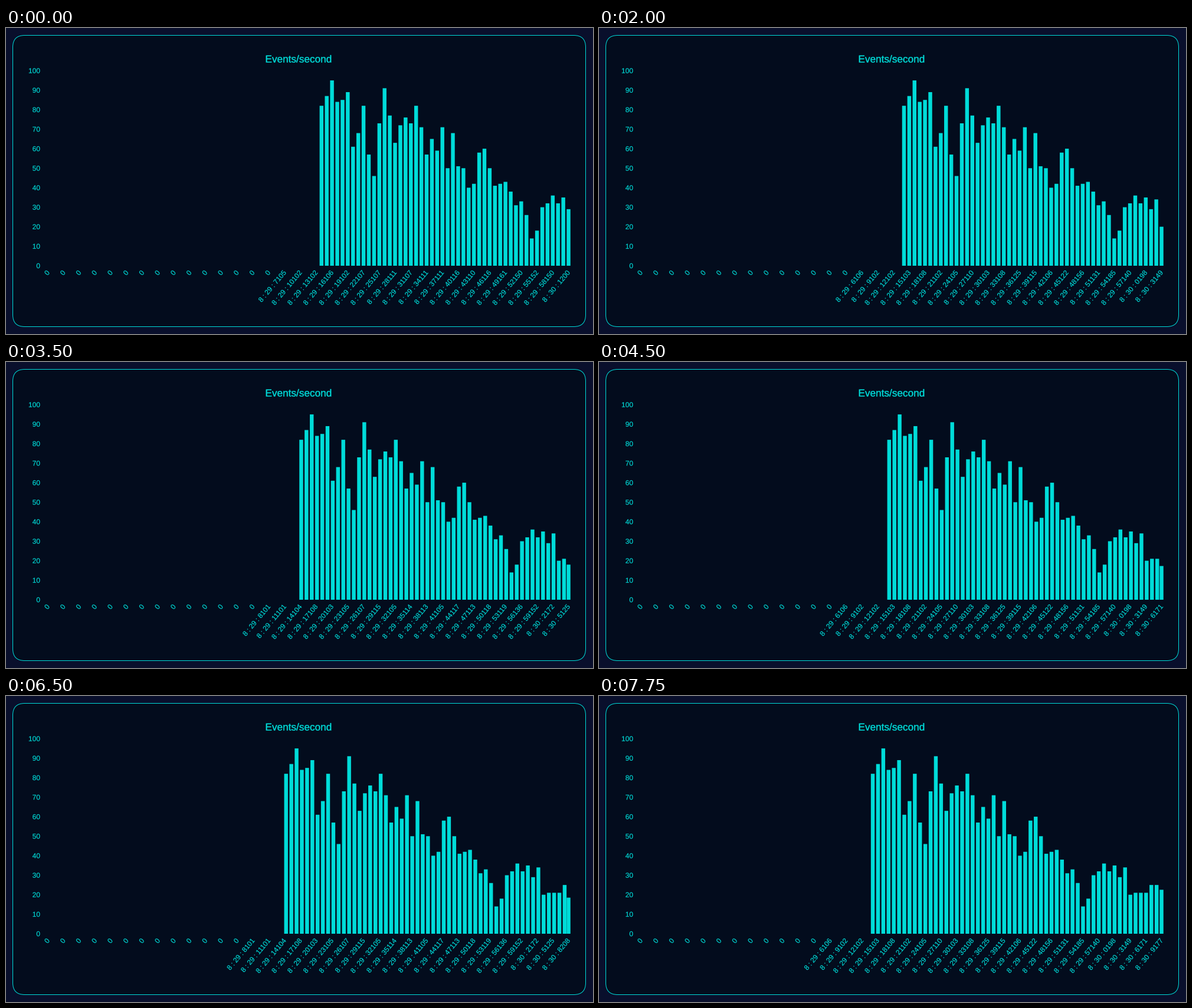
A matplotlib script that plays this animation: 995x520 px, repeating every 8 s.

```python
import matplotlib.pyplot as plt
from matplotlib.animation import FuncAnimation
from matplotlib.patches import FancyBboxPatch, PathPatch, Rectangle
from matplotlib.textpath import TextPath
from matplotlib.transforms import Affine2D

W, H, DPI = 995, 520, 80
STEP_MS, FRAMES = 250, 32
OUTER, PANEL, CYAN = "#090f2c", "#030c1d", "#00dcd9"
FONT = {"family": "Liberation Sans"}

# Chart geometry in pixels
LEFT, RIGHT, BASE, UNIT = 67, 958, 404, 3.315
SLOTS = 100
PITCH = (RIGHT - LEFT) / SLOTS
BAR_W = PITCH * 0.72
TICK_PX, TICK_ANGLE = 11.9, 50

# A new reading arrives every PERIOD ms; seconds count from 8:29:00
PERIOD, PHASE, EASE_MS = 1033, 16, 1000
FIRST_BAR, FIRST_LABEL, NEXT_SEC = 14, 6, 62

VALUES = [
    82, 87, 95, 84, 85, 89, 61, 68, 82, 57, 46, 73, 91, 77, 63, 72, 76, 73, 82,
    71, 57, 65, 59, 71, 50, 68, 51, 50, 40, 42, 58, 60, 50, 41, 42, 43, 38, 31,
    33, 26, 14, 18, 30, 32, 36, 32, 35, 29, 34, 20, 21, 21, 21, 25, 25, 24,
]
MILLIS = [
    106, 105, 101, 102, 102, 101, 102, 102, 104, 103, 106, 108, 108, 102, 103,
    102, 107, 105, 105, 107, 107, 110, 111, 115, 103, 107, 105, 108, 111, 114,
    125, 111, 113, 115, 116, 105, 106, 110, 117, 122, 116, 113, 156, 161, 118,
    131, 150, 119, 185, 152, 136, 140, 150, 152, 198, 200, 172, 149, 128, 125,
    171, 199, 208, 177,
]

fig = plt.figure(figsize=(W / DPI, H / DPI), dpi=DPI, facecolor=OUTER)
ax = fig.add_axes([0, 0, 1, 1])
ax.set_xlim(0, W)
ax.set_ylim(H, 0)
ax.axis("off")


def px(n):
    """Pixels to points."""
    return n * 72 / DPI


glyphs = {}


def text_path(text, size, x, y, align=1.0, angle=0, drop=0):
    """Outline of text; align 1 ends it at x, 0.5 centres it there."""
    key = text, size
    if key not in glyphs:
        path = TextPath((0, 0), text, size=size, prop=FONT)
        glyphs[key] = path, path.get_extents()
    path, box = glyphs[key]
    end = box.x1 + 0.04 * size
    shift = end if align == 1 else box.x0 + align * box.width
    move = Affine2D().scale(1, -1).translate(-shift, drop)
    return move.rotate_deg(-angle).translate(x, y).transform_path(path)


def add_text(path, weight=0.15):
    patch = PathPatch(path, fc=CYAN, ec=CYAN, lw=px(weight), snap=False)
    return ax.add_patch(patch)


def slot_x(slot):
    return LEFT + (slot + 0.5) * PITCH


def tick_path(text, slot):
    return text_path(text, TICK_PX, slot_x(slot), BASE + 9.3,
                     angle=TICK_ANGLE, drop=4.2)


def stamp(sec):
    if sec < FIRST_LABEL:
        return "0"
    return f"8 : {29 + sec // 60} : {sec % 60}{MILLIS[sec - FIRST_LABEL]}"


ax.add_patch(FancyBboxPatch(
    (11.5, 12.5), 971, 495, boxstyle="round,pad=0,rounding_size=20",
    fc=PANEL, ec=CYAN, lw=px(1)))
add_text(text_path("Events/second", 17.2, 496, 58.5, align=0.5), 0.4)
for v in range(0, 101, 10):
    add_text(text_path(str(v), 12, 58, BASE - v * UNIT + 4.2))

bars = [ax.add_patch(Rectangle((0, BASE), BAR_W, 0, fc=CYAN, lw=0, snap=False))
        for _ in VALUES]
tick_slots = range(0, SLOTS, 3)
ticks = [add_text(tick_path("0", slot)) for slot in tick_slots]


def update(i):
    beat, age = divmod(i * STEP_MS - PHASE, PERIOD)
    last = NEXT_SEC + beat
    ease = 1 - (1 - min(1, age / EASE_MS)) ** 4

    # The newest bar grows in place while the older ones slide left
    for n, (bar, value) in enumerate(zip(bars, VALUES)):
        back = last - FIRST_BAR - n
        slot = SLOTS - 1 - back + (1 - ease if back > 0 else 0)
        grown = value if back > 0 else value * ease if back == 0 else 0
        bar.set_x(slot_x(slot) - BAR_W / 2)
        bar.set_height(-grown * UNIT)

    for tick, slot in zip(ticks, tick_slots):
        tick.set_path(tick_path(stamp(last - (SLOTS - 1 - slot)), slot))
    return bars + ticks


anim = FuncAnimation(fig, update, frames=FRAMES, interval=STEP_MS,
                     repeat=True, repeat_delay=0, blit=False)
plt.show()
```
